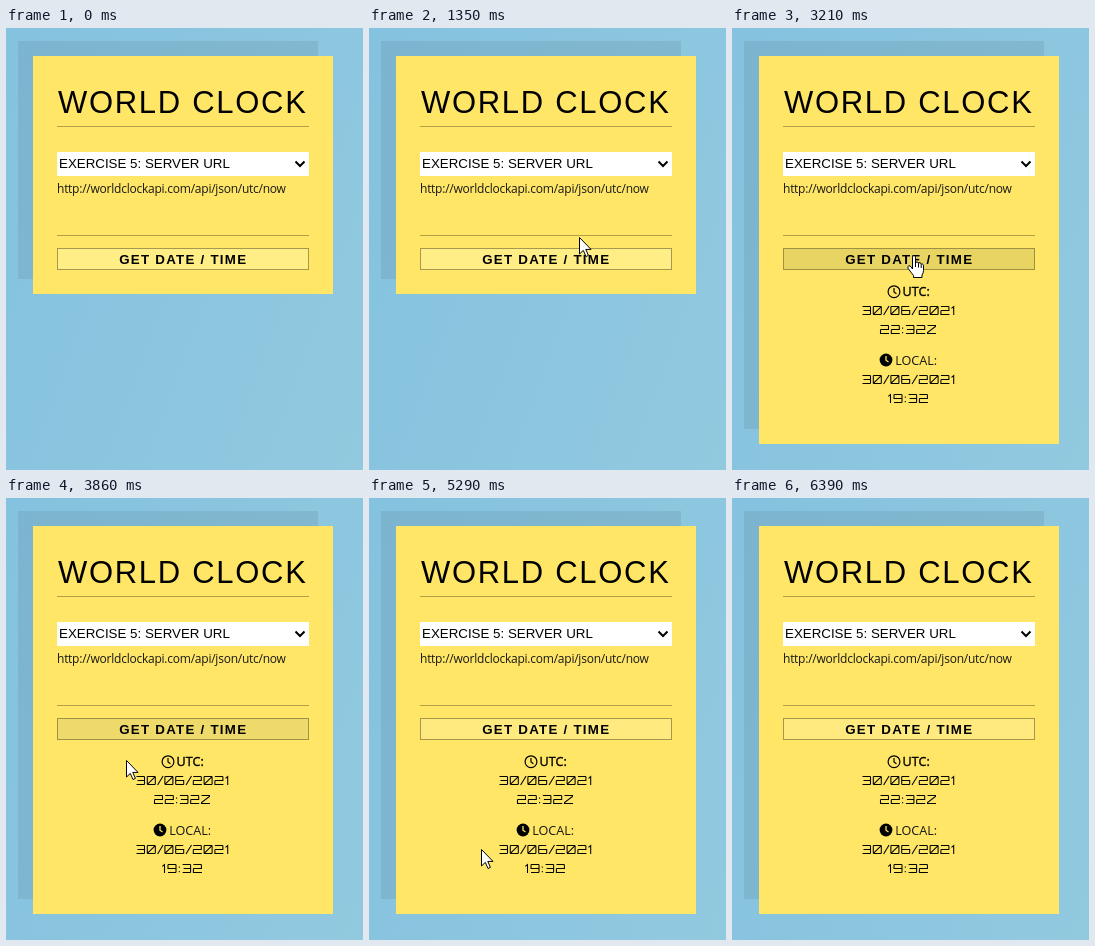
An HTML page for the animation above (8.67 s loop, 357 by 442 pixels).

```html
<!DOCTYPE html>
<html lang="en">
<head>
<meta charset="utf-8">
<title>World clock</title>
<style>
  html, body { margin: 0; width: 100%; height: 100%; overflow: hidden; }
  body { position: relative; background: linear-gradient(110deg, #84c2df, #91c9df); }
  svg { position: absolute; left: 0; top: 0; width: 357px; height: 442px; }
  text { font-family: "Liberation Sans", Arial, sans-serif; white-space: pre; }
  .humanist { font-family: "Open Sans", "Noto Sans", sans-serif; }
  .rule { fill: #000; fill-opacity: .3; }
  .digits path { fill: none; stroke: #000; stroke-width: 1.05; }
  .cursor path { fill: #fff; stroke: #000; stroke-linejoin: round; }
</style>
</head>
<body>
<svg viewBox="0 0 357 442">
  <rect id="shadow" x="12" y="13" width="300" height="238" fill-opacity=".07"/>
  <rect id="card" x="27" y="28" width="300" height="238" fill="#ffe666"/>

  <text x="52" y="85" font-size="31" letter-spacing="1.7">WORLD CLOCK</text>
  <rect class="rule" x="51" y="98" width="252" height="1"/>

  <rect x="51" y="124" width="252" height="24" fill="#fff"/>
  <text x="53" y="140" font-size="13.333">EXERCISE 5: SERVER URL</text>
  <path d="M289.5 133.5 294 138 298.5 133.5" fill="none" stroke="#000" stroke-width="2"/>
  <text class="humanist" x="51" y="165" font-size="12" letter-spacing="-.24" fill="#181818">http://worldclockapi.com/api/json/utc/now</text>
  <rect class="rule" x="51" y="207" width="252" height="1"/>

  <rect id="button" x="51.5" y="220.5" width="251" height="21" stroke="#000" stroke-opacity=".35"/>
  <text x="113.2" y="236" font-size="13.333" font-weight="700" letter-spacing="1.25">GET DATE / TIME</text>

  <g id="result">
    <g fill="none" stroke="#000" stroke-width="1.2">
      <circle cx="162" cy="263.7" r="5.9"/>
      <path d="M162 260v4l2.4 1.8"/>
    </g>
    <text class="humanist" x="170.6" y="268.4" font-size="12.6" stroke="#000" stroke-width=".35">UTC:</text>
    <circle cx="154" cy="332" r="6.4"/>
    <path d="M154 328v4.2l2.5 1.8" fill="none" stroke="#ffe666" stroke-width="1.3"/>
    <text class="humanist" x="163.2" y="337" font-size="12.6" fill="#181818">LOCAL:</text>
  </g>

  <g id="arrow" class="cursor"><path d="M.5.5V17L4.3 13.4 7 19.5 9.4 18.4 6.8 12.4H12Z"/></g>
  <g id="hand" class="cursor">
    <path d="M5.5 14V2.2Q5.5.5 7 .5T8.5 2.2V8Q8.7 7 10 7T11.5 8.5Q11.7 7.6 13 7.8T14.2 9.4Q14.5 8.8 15.4 9T16.5 10.5V15.5Q16.5 18 15 20V22.5H6.5V20.5Q4 17.5 1 13.2Q.3 11.3 1.8 10.8T4 12Z"/>
    <path d="M8.5 8v4M11.5 8.5v4M14.2 9.4V13"/>
  </g>
</svg>
<script>
const LOOP = 8670;
const SHOW_RESULT = 3210, PRESS = 1720, LEAVE = 3780, FADE = 320;
const el = id => document.getElementById(id);
const NS = "http://www.w3.org/2000/svg";

// Wide squared numerals: [advance, stroke path] on a 9 by 9 cell.
const GLYPHS = {
  0: [10.8, "M1 .5H8L8.5 1V8L8 8.5H1L.5 8V1ZM.8 8.2 8.2.8"],
  1: [5.5, "M.3 2.3 2.5.5V9"],
  2: [10.8, "M.5.5H8L8.5 1V4.5H1L.5 5V8.5H9"],
  3: [10.8, "M.5.5H8L8.5 1V8L8 8.5H.5M1.5 4.5H8.5"],
  6: [10.8, "M8 .5H1L.5 1V8L1 8.5H8L8.5 8V4.5H.5"],
  9: [10.8, "M8.5 4.5H.5V1L1 .5H8L8.5 1V8L8 8.5H.5"],
  Z: [10.8, "M.5.5H8.5V1.5L.5 7.5V8.5H9"],
  "/": [6.8, "M0 9 5.5 0"],
  ":": [3.8, "M1 2.5v1.2M1 7v1.2"]
};

function add(parent, tag, attrs) {
  const node = parent.appendChild(document.createElementNS(NS, tag));
  for (const key in attrs) node.setAttribute(key, attrs[key]);
  return node;
}

function drawDigits(label, x, y) {
  const row = add(el("result"), "g", { class: "digits", role: "img", "aria-label": label });
  for (const ch of label) {
    const [advance, d] = GLYPHS[ch];
    add(row, "path", { d, transform: `translate(${x} ${y})` });
    x += advance;
  }
}

drawDigits("30/06/2021", 130, 278);
drawDigits("22:32Z", 148, 297);
drawDigits("30/06/2021", 130, 347);
drawDigits("19:32", 156, 366);

// Pointer strokes: start time, time per step, top left corners.
const strokes = [
  [970, 95, [[322, 191], [301, 193], [273, 197], [242, 203], [210, 209], [164, 225], [175, 227]]],
  [3300, 90, [[175, 224]]],
  [3580, 100, [[158, 219], [134, 232], [120, 262], [136, 288], [175, 297], [214, 290], [231, 270], [224, 255], [208, 250]]],
  [4470, 90, [[187, 249]]],
  [4650, 91, [[150, 272], [126, 330], [150, 385], [220, 394], [280, 365], [293, 315], [190, 280], [112, 351], [134, 391], [180, 394]]],
  [5560, 92, [[230, 410], [262, 392], [271, 360], [245, 325], [200, 309], [155, 322], [134, 358], [150, 400], [190, 419], null]]
];

function pointerAt(t) {
  const stroke = strokes.filter(s => s[0] <= t).pop();
  if (!stroke) return null;
  const [start, step, points] = stroke;
  return points[Math.min(points.length - 1, Math.floor((t - start) / step))];
}

const mix = (a, b, k) => `rgb(${a.map((v, i) => Math.round(v + (b[i] - v) * k))})`;
const IDLE = [255, 237, 133], PRESSED = [231, 212, 99], DONE = [254, 234, 126];

function buttonFill(t) {
  if (t < PRESS) return mix(IDLE, IDLE, 0);
  return mix(PRESSED, DONE, Math.max(0, Math.min(1, (t - LEAVE) / FADE)));
}

function place(node, point, shown) {
  node.style.display = shown ? "" : "none";
  if (shown) node.setAttribute("transform", `translate(${point})`);
}

function draw(t) {
  const open = t >= SHOW_RESULT;
  el("shadow").setAttribute("height", open ? 388 : 238);
  el("card").setAttribute("height", open ? 388 : 238);
  el("result").style.display = open ? "" : "none";
  el("button").setAttribute("fill", buttonFill(t));

  const point = pointerAt(t);
  const overButton = t >= 1440 && t < LEAVE;
  place(el("arrow"), point, point && !overButton);
  place(el("hand"), point, point && overButton);
}

const begin = performance.now();
function tick() {
  draw((performance.now() - begin) % LOOP);
  requestAnimationFrame(tick);
}
tick();
</script>
</body>
</html>
```
